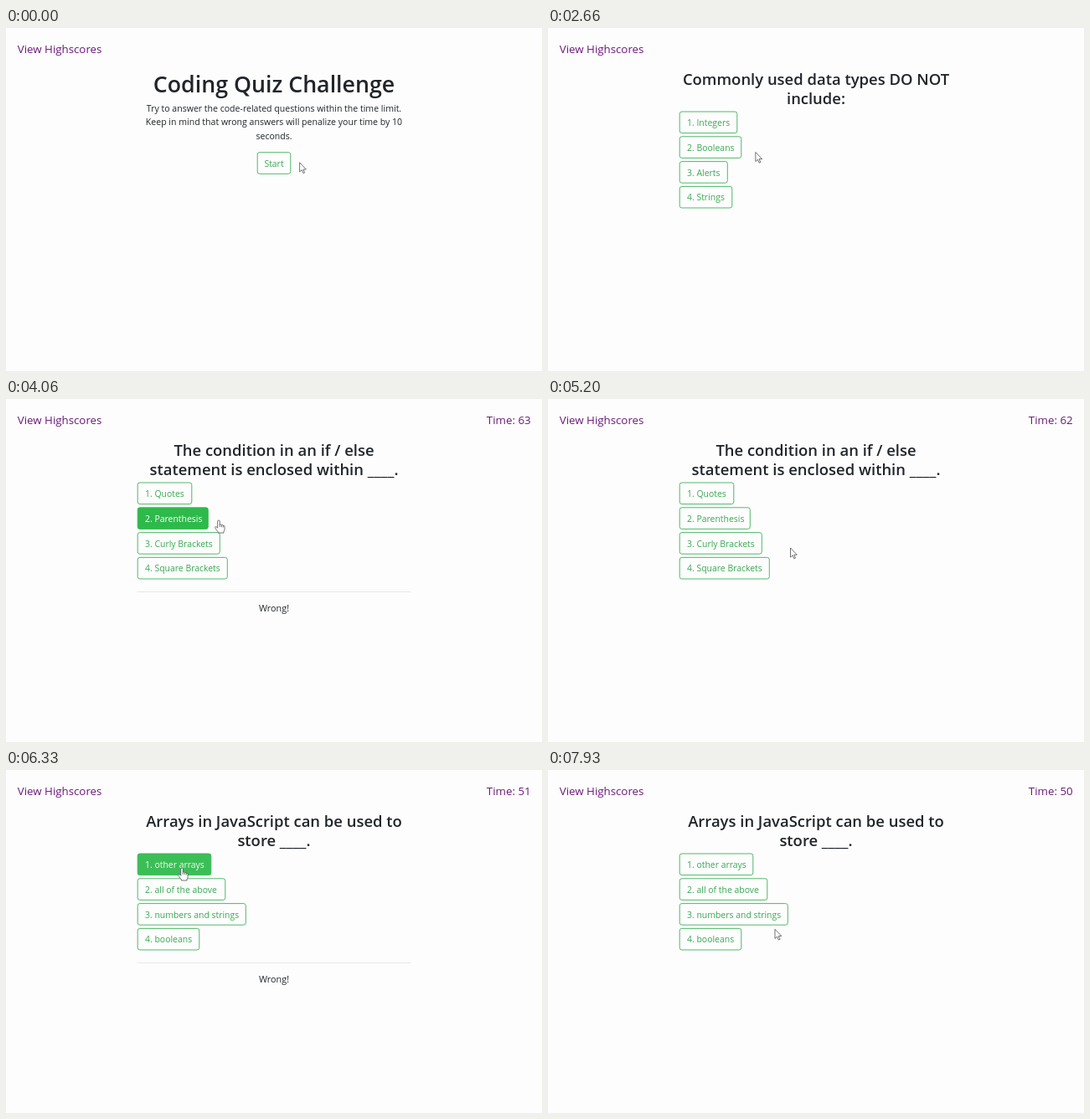
An HTML page that plays this animation: 640 px wide and 410 px high, repeating every 8 s.

```html
<!DOCTYPE html>
<html lang="en">
<head>
<meta charset="utf-8">
<title>Coding Quiz</title>
<style>
html, body { margin: 0; width: 100%; height: 100%; overflow: hidden; background: #fdfdfd; }
svg { display: block; width: 640px; height: 410px; }
text { font-family: "Open Sans", "Noto Sans", sans-serif; font-size: 10.45px; fill: #212529; white-space: pre; }
.nav { font-size: 13.3px; fill: #6a1a78; }
.h1 { font-size: 26.75px; font-weight: 600; }
.h3 { font-size: 18.45px; font-weight: 600; }
.lead { font-size: 10.55px; }
.note { font-size: 10.8px; }
.mid { text-anchor: middle; }
.end { text-anchor: end; }
</style>
</head>
<body>
<svg id="stage" viewBox="0 0 640 410"></svg>
<script>
const LOOP = 8000, STEP = 200 / 3;
const FADE = 150, LAG = 75, NOTE = 800;
const PAPER = [253, 253, 253], INK = [57, 168, 82], FILL = [46, 185, 75], EDGE = [62, 178, 90];
const stage = document.getElementById("stage");

// Answers are [label, right edge of the button]
const scenes = [
  { at: -FADE * 2, intro: true },
  { at: 1930, title: ["Commonly used data types DO NOT", "include:"],
    answers: [["Integers", 226], ["Booleans", 231], ["Alerts", 214.5], ["Strings", 220]] },
  { at: 3590, wrong: true, title: ["The condition in an if / else", "statement is enclosed within ____."],
    answers: [["Quotes", 222], ["Parenthesis", 241.5], ["Curly Brackets", 255.5], ["Square Brackets", 264.5]] },
  { at: 6120, wrong: true, title: ["Arrays in JavaScript can be used to", "store ____."],
    answers: [["other arrays", 245], ["all of the above", 262], ["numbers and strings", 286.5], ["booleans", 231]] }
];

for (const s of scenes) {
  s.buttons = s.intro
    ? [{ x: 300, y: 148.5, w: 40, label: "Start" }]
    : s.answers.map(([label, right], i) =>
        ({ x: 157, y: 99.8 + i * 29.8, w: right - 157, label: `${i + 1}. ${label}` }));
}

// Pointer path: [time, x, y]
const path = [
  [0, 350.6, 160.8], [1000, 350.6, 160.8], [1467, 316, 160],
  [2133, 316, 160], [2267, 302, 158], [2333, 302, 158], [2667, 247.8, 148.4],
  [2733, 247.8, 148.4], [3067, 216, 146], [3467, 216, 146], [3930, 222, 146],
  [4067, 254, 145], [4333, 270, 152], [5200, 289.5, 178],
  [5267, 287, 177], [6067, 209, 117], [6333, 210, 117], [6933, 266, 158],
  [7133, 266, 158], [7600, 271, 190.3], [LOOP, 271, 190.3]
];

function pointer(t) {
  t = Math.max(0, t);
  let i = 1;
  while (i < path.length - 1 && path[i][0] < t) i++;
  const [t0, x0, y0] = path[i - 1], [t1, x1, y1] = path[i];
  const u = Math.min(1, (t - t0) / (t1 - t0));
  return { x: x0 + (x1 - x0) * u, y: y0 + (y1 - y0) * u };
}

function inside(b, t) {
  const p = pointer(t);
  return p.x >= b.x && p.x <= b.x + b.w && p.y >= b.y && p.y <= b.y + 26;
}

// Share of the last FADE ms that the pointer spent on the button
function hover(b, t, since) {
  const n = 30;
  let hits = 0;
  for (let i = 0; i < n; i++) {
    const s = t - LAG - (i + 0.5) / n * FADE;
    if (s >= since && inside(b, s)) hits++;
  }
  return hits / n;
}

const mix = (a, b, u) => `rgb(${a.map((v, i) => Math.round(v + (b[i] - v) * u))})`;
const text = (x, y, str, cls = "", extra = "") =>
  `<text x="${x}" y="${y}" class="${cls}" ${extra}>${str}</text>`;

function button(b, u, centered) {
  const x = centered ? b.x + b.w / 2 : b.x + 9;
  return `<rect x="${b.x + 0.2}" y="${b.y + 0.2}" width="${b.w - 0.4}" height="25.6" rx="2.6"
    fill="${mix(PAPER, FILL, u)}" stroke="${mix(EDGE, FILL, u)}" stroke-width="0.9"/>` +
    text(x, b.y + 17.1, b.label, centered ? "mid" : "", `style="fill:${mix(INK, [255, 255, 255], u)}"`);
}

function cursor(p, hand) {
  const d = hand
    ? "M-1.3 1.2Q-1.2 0 0 0T1.3 1.2V5.2Q2.5 4.5 3.5 5.6Q4.6 5 5.4 6.2Q7 5.9 7.1 7.6V10.5Q7 12.5 6 13.5V15H-.6V14Q-2.5 12-4 9.4Q-4.7 8-3.6 7.6Q-2.5 7.5-1.3 9.2ZM1.3 5.2V8M3.5 5.6V8.2M5.4 6.2V8.4"
    : "M0 0V11.2L2.6 8.8L4.3 12.8L6 12.1L4.3 8.2H7.8Z";
  return `<path transform="translate(${p.x} ${p.y})" d="${d}" fill="#fff" stroke="#44444e"
    stroke-width="0.75" stroke-linejoin="round"/>`;
}

function intro() {
  const lines = [
    "Try to answer the code-related questions within the time limit.",
    "Keep in mind that wrong answers will penalize your time by 10",
    "seconds."
  ];
  return text(320, 76.5, "Coding Quiz Challenge", "h1 mid") +
    lines.map((l, i) => text(320, 99.8 + i * 16.5, l, "lead mid")).join("");
}

function draw(t) {
  const past = scenes.filter(s => s.at <= t);
  const scene = past[past.length - 1];
  const penalty = 10 * past.filter(s => s.wrong).length;
  const ticks = Math.floor((t - 1999) / 1000);

  let out = text(13.8, 29.6, "View Highscores", "nav");
  if (ticks > 0) out += text(626.6, 29.6, `Time: ${75 - ticks - penalty}`, "nav end");
  out += scene.intro ? intro() : scene.title.map((l, i) => text(320, 68 + i * 23, l, "h3 mid")).join("");
  for (const b of scene.buttons) out += button(b, hover(b, t, scene.at), scene.intro);

  if (scene.wrong && t < scene.at + NOTE) {
    out += `<path d="M156.5 230.5H483.5" stroke="#e6e6e6" stroke-width="0.9"/>` +
      text(320, 254.4, "Wrong!", "note mid");
  }
  const hand = scene.buttons.some(b => inside(b, t - LAG));
  stage.innerHTML = out + cursor(pointer(t), hand);
}

let last = -1;
function tick() {
  const k = Math.floor((performance.now() % LOOP + 7) / STEP) % (LOOP / STEP);
  if (k !== last) draw((last = k) * STEP);
  requestAnimationFrame(tick);
}
tick();
</script>
</body>
</html>
```
